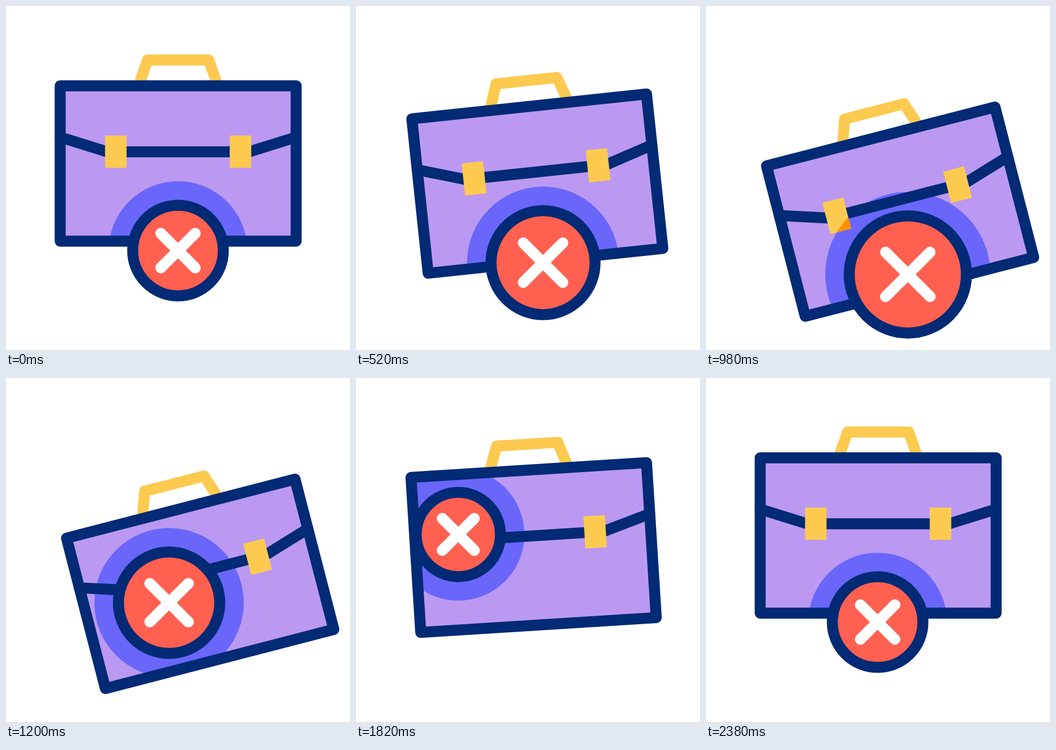
These frames come from a looping animation (640 by 640 pixels, 2400 ms). An HTML page with a canvas:

```html
<!DOCTYPE html>
<html lang="en">
<head>
<meta charset="utf-8">
<title>Briefcase rejected</title>
<style>
  html, body { margin: 0; height: 100%; overflow: hidden; background: #fff; }
  canvas { display: block; }
</style>
</head>
<body>
<canvas width="640" height="640"></canvas>
<script>
const ctx = document.querySelector('canvas').getContext('2d');
const LOOP = 2400, LINE = 20.5;
const NAVY = '#032a75', PURPLE = '#bb99f2', HALO = '#6966f9';
const YELLOW = '#fdca50', ORANGE = '#ff9100', RED = '#ff6050';

// The badge travels between three poses
const REST = { x: 320, y: 455, r: 84.3 };
const LOW = { x: 375.7, y: 499.6, r: 109.1 };
const CORNER = { x: 185.5, y: 285, r: 70 };

const clamp = u => Math.min(1, Math.max(0, u));
const mix = (a, b, u) => a + (b - a) * u;
const progress = (t, start, end) => clamp((t - start) / (end - start));
const easeOut = (u, power) => 1 - (1 - u) ** power;

// Symmetric cubic-bezier(a, 0, 1 - a, 1)
function ease(u, a) {
  let lo = 0, hi = 1;
  for (let i = 0; i < 24; i++) {
    const s = (lo + hi) / 2, r = 1 - s;
    if (3 * r * r * s * a + 3 * r * s * s * (1 - a) + s ** 3 < u) lo = s; else hi = s;
  }
  return lo * lo * (3 - 2 * lo);
}
const move = (t, start, end, a = .57) => ease(progress(t, start, end), a);

function makePath(build) {
  const path = new Path2D();
  build(path);
  return path;
}
const circle = (x, y, r) => makePath(p => p.arc(x, y, r, 0, 2 * Math.PI));

// Polyline from its left half, mirrored about x = 0
const mirrored = (...left) => makePath(p => {
  for (const [x, y] of left) p.lineTo(-x, y);
  for (const [x, y] of left.reverse()) p.lineTo(x, y);
});

// Parts of the case, around its centre
const body = makePath(p => p.rect(-219.5, -144.4, 439, 288.9));
const flap = mirrored([219.5, -49], [132, -21.7]);
const handle = mirrored([73.4, -145], [57, -192.5]);
const clasps = makePath(p => { for (const x of [-116, 116]) p.rect(x - 20, -52, 40, 60); });

function stroke(path, color) {
  ctx.strokeStyle = color;
  ctx.stroke(path);
}

function fill(path, color) {
  ctx.fillStyle = color;
  ctx.fill(path);
}

function segment(x1, y1, x2, y2, color) {
  stroke(makePath(p => { p.moveTo(x1, y1); p.lineTo(x2, y2); }), color);
}

function drawCase(tilt, halo) {
  const haloInside = (path, color) => {
    ctx.save();
    ctx.clip(path);
    ctx.resetTransform();
    fill(halo, color);
    ctx.restore();
  };
  ctx.save();
  ctx.translate(320.3 + 41.2 * tilt, 293 + 90.4 * tilt);
  ctx.rotate(-14.57 * tilt * Math.PI / 180);
  stroke(handle, YELLOW);
  fill(body, PURPLE);
  haloInside(body, HALO);
  stroke(flap, NAVY);
  stroke(body, NAVY);
  fill(clasps, YELLOW);
  haloInside(clasps, ORANGE);
  ctx.restore();
}

function drawBadge({ x, y, r }) {
  const disc = circle(x, y, r), d = r * .38;
  fill(disc, RED);
  stroke(disc, NAVY);
  for (const side of [-1, 1])
    segment(x - d, y - d * side, x + d, y + d * side, '#fff');
}

// Three lines fly out from the corner, the middle one further
function drawSparks(t) {
  if (t < 1400 || t >= 1800) return;
  const outer = mix(32, 95, easeOut(progress(t, 1400, 1820), 2));
  const inner = Math.min(outer, mix(32, 95, progress(t, 1475, 1800)));
  for (let i = 0; i < 3; i++) {
    const angle = -(98 + 46 * i) * Math.PI / 180, reach = i === 1 ? 1.11 : 1;
    const dx = Math.cos(angle) * reach, dy = Math.sin(angle) * reach;
    segment(108.7 + dx * inner, 217 + dy * inner, 108.7 + dx * outer, 217 + dy * outer, RED);
  }
}

function badgeAt(t) {
  const drop = move(t, 0, 1040), hit = move(t, 1040, 1400);
  const back = move(t, 1690, 2435, .6), grow = easeOut(progress(t, 1400, LOOP), 1.6);
  const along = (key, home) =>
    mix(mix(mix(REST[key], LOW[key], drop), CORNER[key], hit), REST[key], home);
  return { x: along('x', back), y: along('y', back), r: along('r', grow) };
}

function frame(now) {
  const t = now % LOOP, badge = badgeAt(t);
  const tilt = move(t, 0, 1100, .7) - move(t, 1100, 2310, .68);
  ctx.clearRect(0, 0, 640, 640);
  ctx.lineWidth = LINE;
  ctx.lineCap = ctx.lineJoin = 'round';
  drawCase(tilt, circle(badge.x, badge.y, badge.r + 44.7));
  drawSparks(t);
  drawBadge(badge);
  requestAnimationFrame(frame);
}
requestAnimationFrame(frame);
</script>
</body>
</html>
```
